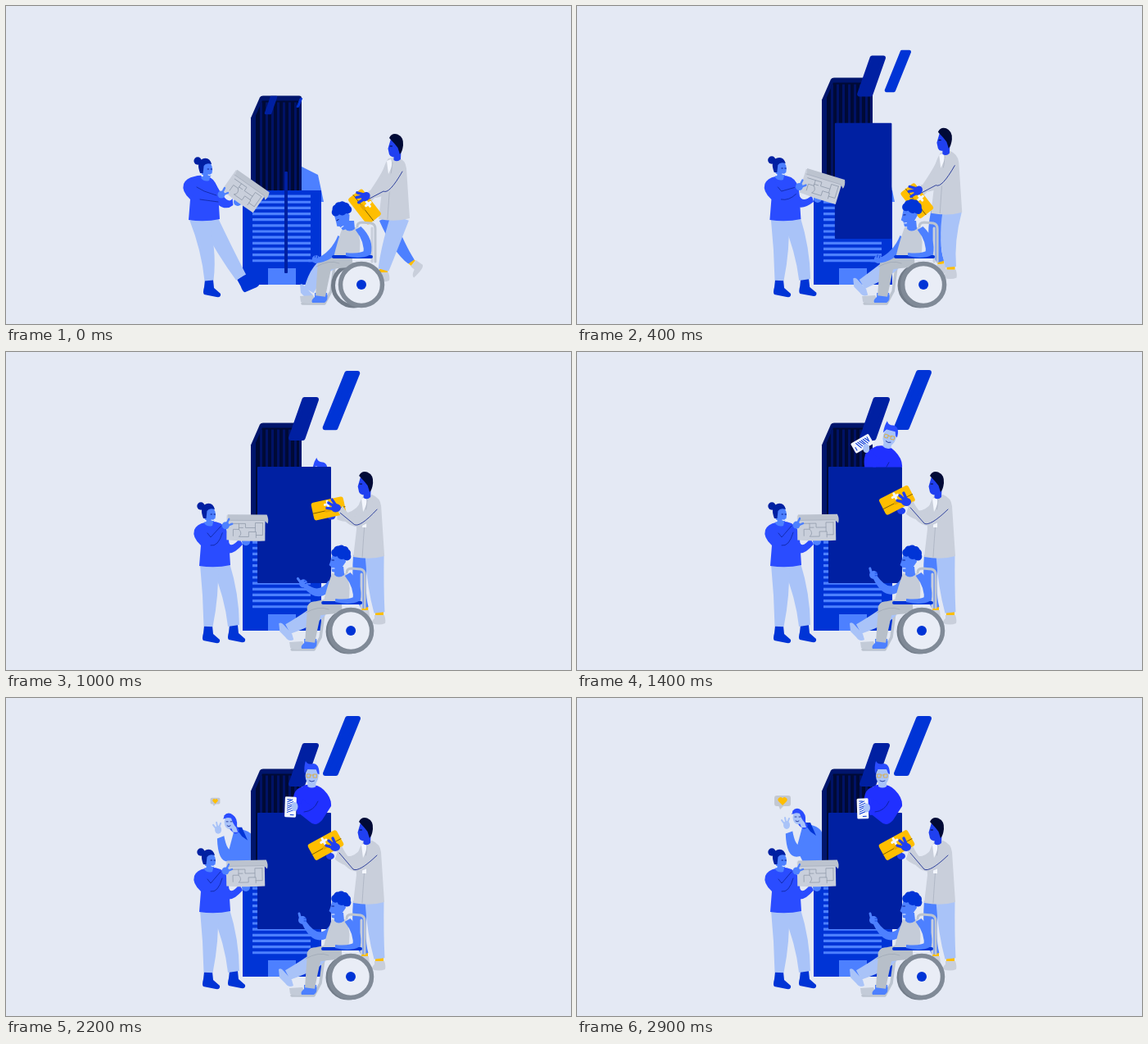
Recreate the animation shown at these times as an HTML page with a canvas. Size 690 by 388 pixels, loop 3000 ms.

```html
<!DOCTYPE html>
<html lang="en">
<head>
<meta charset="utf-8">
<title>Team around a building</title>
<style>
html, body { margin: 0; width: 100%; height: 100%; overflow: hidden; background: #e4e9f4; }
canvas { display: block; width: 690px; height: 388px; }
</style>
</head>
<body>
<canvas id="stage"></canvas>
<script>
const W = 690, H = 388, LOOP = 3000, STEP = 100;
const canvas = document.getElementById('stage');
const ctx = canvas.getContext('2d');
const dpr = window.devicePixelRatio || 1;
canvas.width = W * dpr;
canvas.height = H * dpr;

const BG = '#e4e9f4', NAVY = '#001266', INK = '#000a36', DEEP = '#0020a2', BLUE = '#0034d6',
  MID = '#2a4cff', SKIN = '#2040f0', SKY = '#4d80ff', PALE = '#a9c3f8', GREY = '#c9cfdb',
  TUBE = '#bcc4d0', STEEL = '#808a97', YELLOW = '#ffbe00', LINE = '#0a1f8f', WHITE = '#f3f6fd';

// Motion: decay falls from 1 to 0 at once, settle rises smoothly from 0 to 1.
const decay = (t, tau) => Math.exp(-t / tau);
const settle = (t, from, pace) => {
  const x = Math.max(0, t - from) / pace;
  return 1 - (1 + x + x * x / 2) * Math.exp(-x);
};
const mix = (a, b, u) => a + (b - a) * u;

function fill(d, color) {
  ctx.fillStyle = color;
  ctx.fill(new Path2D(d));
}
function line(d, color, w = 1) {
  ctx.strokeStyle = color;
  ctx.lineWidth = w;
  ctx.stroke(new Path2D(d));
}
function dot(x, y, rx, color, ry = rx) {
  ctx.fillStyle = color;
  ctx.beginPath();
  ctx.ellipse(x, y, rx, ry, 0, 0, 7);
  ctx.fill();
}
function ring(x, y, r, color, w) {
  ctx.strokeStyle = color;
  ctx.lineWidth = w;
  ctx.beginPath();
  ctx.arc(x, y, r, 0, 7);
  ctx.stroke();
}
function rect(x, y, w, h, color, r = 0) {
  ctx.fillStyle = color;
  ctx.beginPath();
  ctx.roundRect(x, y, w, h, r);
  ctx.fill();
}
function at(x, y, deg, draw, scale = 1) {
  ctx.save();
  ctx.translate(x, y);
  ctx.rotate(deg * Math.PI / 180);
  ctx.scale(scale, scale);
  draw();
  ctx.restore();
}
// Tapered curved limb through three points [x, y, width].
function limb(color, a, m, b) {
  const side = (p, from, to, s) => {
    const dx = to[0] - from[0], dy = to[1] - from[1], l = Math.hypot(dx, dy) || 1;
    return [p[0] - s * dy / l * p[2] / 2, p[1] + s * dx / l * p[2] / 2];
  };
  const edge = s => [side(a, a, m, s), side(m, a, b, s), side(b, m, b, s)];
  const ctrl = ([p, q, r]) => [2 * q[0] - (p[0] + r[0]) / 2, 2 * q[1] - (p[1] + r[1]) / 2];
  const l = edge(1), r = edge(-1);
  ctx.fillStyle = color;
  ctx.beginPath();
  ctx.moveTo(...l[0]);
  ctx.quadraticCurveTo(...ctrl(l), ...l[2]);
  ctx.lineTo(...r[2]);
  ctx.quadraticCurveTo(...ctrl(r), ...r[0]);
  ctx.fill();
}

function waver(t) {
  const hide = 1 - settle(t, 1600, 110);
  if (hide === 1) return;
  at(34 * hide, 64 * hide, 0, () => {
    fill('M276,154 Q296,154 300,166 L300,200 L276,200 L268,184 Z', SKY);
    limb(SKY, [284, 176, 16], [267, 186, 15], [259, 164, 9]);
    fill('M277,152 L285,152 L292,168 L285,163 Z', BLUE);
    fill('M263,138 Q268,132 274,137 Q280,141 279,151 Q285,158 277,160 Q270,156 268,150 Z', MID);
    dot(270, 146, 6.5, PALE, 8);
    fill('M271,150 L277,149 L280,158 L274,158 Z', PALE);
    fill('M262,142 Q265,133 273,137 Q279,141 278,152 Q274,148 272,141 Q267,139 262,142 Z', MID);
    line('M266,145 h2 M271,145 h2 M267,150 q2,2 4,0', LINE, .8);
    dot(256, 155, 4, PALE, 5);
    line('M253,153 L250,149 M255,151 L254,146 M257,152 L259,147', PALE, 2);
  });
  at(250 + 6 * (1 - settle(t, 2000, 200)), 126, 0, () => {
    rect(-10, -7, 20, 13, '#c3c8d1', 3);
    fill('M-5,5 L-3,10 L2,5 Z', '#c3c8d1');
    fill('M0,5 L-5,0 A3,3 0 0 1 0,-3.5 A3,3 0 0 1 5,0 Z', YELLOW);
  }, settle(t, 2000, 65));
}

function tower(t) {
  const y = 86.5 + 23 * decay(t, 130);
  fill(`M299,226 V${y + 27} L310,${y + 2} Q311,${y} 314,${y} H358 Q361,${y} 361,${y + 3} V226 Z`, '#00156c');
  fill(`M305,226 V${y + 24} L313,${y + 6} H358 V226 Z`, INK);
  for (let x = 310; x < 358; x += 7) rect(x, y + 8, 3, 218 - y, NAVY);
  fill('M361,196 L381,206 L388,239 H361 Z', SKY);
}

function bars(t) {
  const bar = (x, y, scale, color, d) => at(x, y, 0, () => {
    ctx.lineJoin = 'round';
    fill(d, color);
    line(d, color, 6);
  }, scale);
  const a = settle(t, 0, 75), b = settle(t, 0, 120);
  bar(mix(323.5, 363.5, a), mix(121, 81.5, a), mix(.42, 1, a), DEEP, 'M1,-23.5 H15.5 L-1,23.5 H-15.5 Z');
  bar(mix(358.5, 410, b), mix(118, 58.5, b), mix(.16, 1, b), BLUE, 'M7,-33.5 H20 L-7,33.5 H-20 Z');
}

function block(t) {
  rect(289, 225, 96, 115, BLUE);
  for (let i = 0; i < 12; i++) rect(301, 230.5 + i * 7.15, 71, 3.2, SKY);
  rect(320, 320, 34, 20, SKY);
  const rise = decay(t, 130), open = settle(t, 200, 50);
  rect(mix(340, 307, open), 140 + 62 * rise, mix(4, 90, open), 142 - 18 * rise, DEEP, 1);
}

function peeker(t) {
  const hide = 1 - settle(t, 800, 120), lean = 1 - settle(t, 1300, 150), y = 70 * hide;
  if (hide === 1) return;
  const px = 349 - 26 * lean * (1 - lean), py = 135 - 33 * lean + y;
  const hx = px + 5, hy = py - 1 + 7 * lean;
  ctx.save();
  ctx.beginPath();
  ctx.rect(290, 0, 120, 156 - 16 * lean);
  ctx.clip();
  at(0, y, 0, () => fill('M366,106 Q380,104 388,112 Q398,122 397,132 L386,149 Q378,158 371,151 L352,136 Q348,118 356,111 Z', '#2030ff'));
  at(373 + 9 * lean, 95 + y, 16 * lean, () => {
    fill('M-5,5 H5 V13 Q0,16 -5,13 Z', PALE);
    dot(0, 0, 8, PALE, 11);
    fill('M-9,-3 Q-10,-12 -8,-18 Q-5,-13 1,-15 Q9,-15 9,-2 L7,-3 L5,-8 L-6,-8 Z', MID);
    line('M-6,-2 h4 v4 h-4 z M2,-2 h4 v4 h-4 z M-2,-1 h4', '#d8b04c', .9);
    line('M-3,6 q3,2 6,0', LINE, .8);
  });
  limb('#2030ff', [368, 128 + y, 14], [362, (hy + 138 + y) / 2, 12], [hx + 2, hy + 5, 9]);
  line(`M381,${126 + y} Q376,${138 + y} 364,${139 + y}`, LINE, .8);
  at(px, py, -2 + 64 * lean, () => {
    rect(-7, -12.5, 14, 25, WHITE, 1.5);
    for (let i = 0; i < 6; i++) line(`M-4,${-6 + i * 2.5} l${6 + i % 3},-3`, BLUE, 1);
    line('M-4,-9 h4 M0,9.5 h4', BLUE, 1);
  });
  dot(hx, hy, 4, PALE, 5.5);
  ctx.restore();
}

function shoe(x, y, deg) {
  at(x, y, deg, () => fill('M-5,-1 H5 L6,9 L14,16 Q15,21 9,20 L-6,17 Q-8,15 -6,8 Z', BLUE));
}

function planner(t) {
  const k = decay(t, 100), dx = -13 * decay(t, 130), turn = settle(t, 0, 150);
  const px = 305 + dx - 12 * turn, py = 226 - 12 * turn;
  const nx = px - mix(28, 24, turn), ny = py + mix(2, -5, turn);
  const fx = px - mix(11, 2, turn), fy = py + mix(11, 15, turn);

  shoe(247 + k, 335, 0);
  shoe(278 + 9 * k, 334 - 2 * k, -35 * k);
  limb(PALE, [262 - 15 * k, 259, 22], [273 - 6 * k, 297, 18 + k], [278 + 9 * k, 334 - 3 * k, 14]);
  limb(PALE, [248 - 13 * k, 259, 22], [249 - 4 * k, 297, 18], [247 + k, 335, 11]);

  limb(MID, [264 + dx, 222, 14], [272 + dx * .5, 240, 11], [fx - 4, fy + 2, 8]);
  at(dx, 0, 0, () => {
    fill('M243,208 Q252,205 262,209 Q271,214 272,228 L274,260 Q256,264 236,261 L238,236 Q227,226 230,217 Q233,210 243,208 Z', MID);
  });
  at(dx * .3, k, 0, () => {
    fill('M244,203 L253,208 L252,212 Q246,214 242,209 Z', SKY);
    dot(249, 199, 7, SKY, 10.5);
    dot(238, 188, 4.7, DEEP);
    fill('M241,203 Q236,190 243,186 Q252,182 255,192 Q248,190 245.5,194 L244.5,203 Z', DEEP);
    dot(243.5, 206, 1.2, WHITE);
    line('M251,205 q3,1 4,-1', WHITE, 1.2);
    line('M250,198 h1.5 M254,198 h1.5', LINE, 1);
  });

  dot(fx + 2, fy + 2, 5, SKY);
  at(px, py, 36 * (1 - turn) - 1, () => {
    fill('M-24,-15 H23 L23,16 Q0,17 -24,15 Z', GREY);
    fill('M-23,-16 H25 Q28,-10 26,-5 L22,-9 H-21 Z', '#bcc3cf');
    line('M-19,-5 h10 v7 h-7 v8 M-9,-5 h8 v5 h12 v-6 h9 M-9,2 q5,5 0,9 h12 v-6 h9 v7 M11,0 v5 M20,-6 v15 h-8 M-4,0 h-5', '#929cac', .8);
    line('M-22,-9 H22', '#a3abba', .7);
  });
  limb(MID, [237 + dx, 218, 15], [249 + dx * .6, 230, 13], [nx - 5, ny + 5, 8]);
  line(`M${246 + dx},221 L${250 + dx * .6},226 L${nx - 7},${ny + 3}`, LINE, .7);
  line(`M${nx - 5},${ny + 11} Q${259 + dx * .6},238 ${250 + dx},236`, LINE, .7);
  dot(nx - 1, ny + 2, 4.5, SKY);
  line(`M${nx},${ny} l3,-6 M${nx + 2},${ny + 2} l5,-2`, SKY, 2.4);
}

function medic(t) {
  const away = 1 - settle(t, 0, 105), dx = 31 * away, dy = 10 * away;
  const stride = decay(t, 180), lift = settle(t, 450, 130);
  const px = mix(407, 390.5, lift) + dx, py = mix(235, 179.5, lift) + dy;
  const ex = mix(433, 427, lift) + dx, ey = mix(212, 205, lift) + dy;
  const wx = mix(413, 407, lift) + dx, wy = mix(220, 184, lift) + dy;
  const cx = 438 + 57 * stride, ax = 456 + 5 * stride, ay = 318 + 4 * stride;

  at(cx, 312, -50 * stride, () => {
    rect(-4, -1, 8, 4, YELLOW);
    fill('M-5,3 H5 L6,13 Q4,17 -13,15 Q-13,11 -5,9 Z', GREY);
  });
  limb(SKY, [433 + dx, 248 + dy, 18], [432 + 48 * stride, 286 + 5 * stride, 15], [cx, 312, 9]);
  rect(ax - 5, ay - 1, 10, 5, YELLOW);
  fill(`M${ax - 6},${ay + 3} h12 q2,6 1,10 q-7,3 -16,0 q0,-4 3,-6 z`, GREY);
  limb(PALE, [450 + dx, 248 + dy, 23], [452 + 17 * stride, 285 + 9 * stride, 19], [ax, ay, 13]);

  limb(GREY, [437 + dx, 189 + dy, 13], [ex - 6, ey - 6, 12], [wx - 4, wy + 9, 8]);
  dot(wx - 11, wy + 9, 5, SKIN, 4);
  at(dx, dy, 0, () => {
    fill('M436,176 L447,174 Q457,178 458,188 L462,249 Q445,254 424,250 L428,216 Q426,190 436,176 Z', GREY);
    fill('M434,179 L439,177 L441,184 L436,195 Z', WHITE);
    line('M441,181 Q438,200 435,250', '#aab2c1', .8);
    rect(435, 208, 5, 6, WHITE);
  });
  at(dx + 6 * away, dy, 0, () => {
    fill('M433,152 L429.5,164 L431,171 Q433,175 436.5,174 L436.5,178 Q441,181 445,177 L446,156 Z', SKIN);
    fill('M431,151 Q434,144.5 441,146.5 Q449,150 448,160 Q447,168 444,171 L441.5,163 L437.5,158 Z', INK);
    line('M432,161 h2.5', INK, 1);
  });

  at(px, py, mix(52, -29, lift), () => {
    rect(-20, -11, 40, 22, YELLOW, 3);
    line('M-20,2 H-5 M3,2 H20', '#7a5c00', .9);
    rect(-5, 0, 8, 4, '#e8a800', 1);
    line('M0,-9 v7 M-3.5,-5.5 h7', WHITE, 3);
  });
  limb(GREY, [452 + dx, 188 + dy, 15], [ex, ey, 13], [wx, wy, 9]);
  line(`M${453 + dx},${192 + dy} Q${ex + 4},${ey + 8} ${ex - 3},${ey + 4} L${wx},${wy + 5}`, LINE, .8);
  at(wx, wy, -50 * (1 - lift), () => {
    dot(-5, -2, 6, SKIN, 5);
    line('M-6,-4 l-7,-6 M-7,-1 l-9,-3 M-4,-4 l-4,-9', SKIN, 3.4);
  });
}

function rider(t) {
  const k = decay(t, 220), dx = 13 * k, up = settle(t, 600, 110);
  const wx = mix(366, 363, up) + dx, wy = mix(308, 271, up);
  const fx = 341 + 2 * dx, fy = 338 + 9 * k;

  at(dx, 0, 0, () => {
    line('M416,269 Q416,264 422,264 L433,265 Q438,266 438,272 L438,312', TUBE, 3);
    line('M434,271 V312', GREY, 3);
    ctx.lineJoin = 'round';
    line('M388,318 L384,348 L376,363 H349', TUBE, 3.5);
  });
  ring(418 + dx * .5, 341, 25, '#727c89', 5);
  limb(PALE, [385 + dx, 313, 18], [371 + dx * .9, 324, 18], [fx + 3, fy, 13]);
  at(fx, fy, 0, () => fill('M-8,-7 Q-5,-9 -2,-5 L8,6 L10,13 Q4,16 0,10 L-7,3 Z', PALE));

  at(dx, 0, 0, () => {
    fill('M346,354 L362,353 L366,361 Q356,365 347,361 Z', '#c3cbd8');
    fill('M364,350 H379 Q381,359 376,362 H361 Q359,359 364,355 Z', SKY);
    limb('#b7bfc9', [410, 310, 17], [392, 311, 18], [374, 314, 17]);
    dot(376, 313, 8.5, '#b7bfc9');
    limb('#b7bfc9', [377, 312, 18], [374, 332, 15], [371, 354, 12]);
    line('M366,318 Q382,309 394,314', '#9da6b3', .7);
  });
  limb(SKY, [397 + dx, 283, 11], [mix(385, 380, up) + dx, mix(301, 290, up), 10], [wx + 1, wy + 3, 6]);
  at(wx, wy, -75 * (1 - up), () => {
    dot(-1, 0, 5, SKY);
    line('M-3,0 L-5,-8', SKY, 3);
    line('M1,-2 h3 M1,1 h3', BLUE, .7);
  });
  at(dx, 0, 0, () => {
    fill('M398,270 L415,270 Q423,288 417,307 L387,307 Q392,286 398,270 Z', '#c5ccd8');
    line('M387,306 H433', BLUE, 4);
    limb(SKY, [417, 271, 8], [427, 287, 10], [428, 304, 9]);
    limb(SKY, [430, 300, 8], [418, 304, 6], [402, 303, 4]);
    fill('M401,262 L412,262 L413,272 Q406,277 401,272 Z', SKY);
  });
  at(408 + dx, 270, -32 * k, () => {
    fill('M-9,-24 L-12,-14 L-13.5,-10 L-11,-8 L-10,-2 Q-5,0 0,-4 L7,-14 L4,-25 Z', SKY);
    for (let i = 0; i < 6; i++) {
      const a = 3.6 + i * .58;
      dot(1 + 7.5 * Math.cos(a), -22 + 7.5 * Math.sin(a), 5, BLUE);
    }
    dot(2, -23, 6, BLUE);
    line('M-10,-16 h2.5', LINE, 1);
    line('M-10,-6 h3', WHITE, 1);
  });
  dot(421 + dx, 340, 25, '#e9edf6');
  ring(421 + dx, 340, 25.5, STEEL, 5.5);
  dot(421 + dx, 340, 6, BLUE);
}

function render(t) {
  ctx.setTransform(dpr, 0, 0, dpr, 0, 0);
  ctx.lineCap = 'round';
  rect(0, 0, W, H, BG);
  for (const part of [waver, tower, bars, block, peeker, planner, medic, rider]) part(t);
}

const start = performance.now();
function tick() {
  const t = (performance.now() - start) % LOOP;
  render(Math.floor(t / STEP) * STEP);
  requestAnimationFrame(tick);
}
tick();
</script>
</body>
</html>
```
